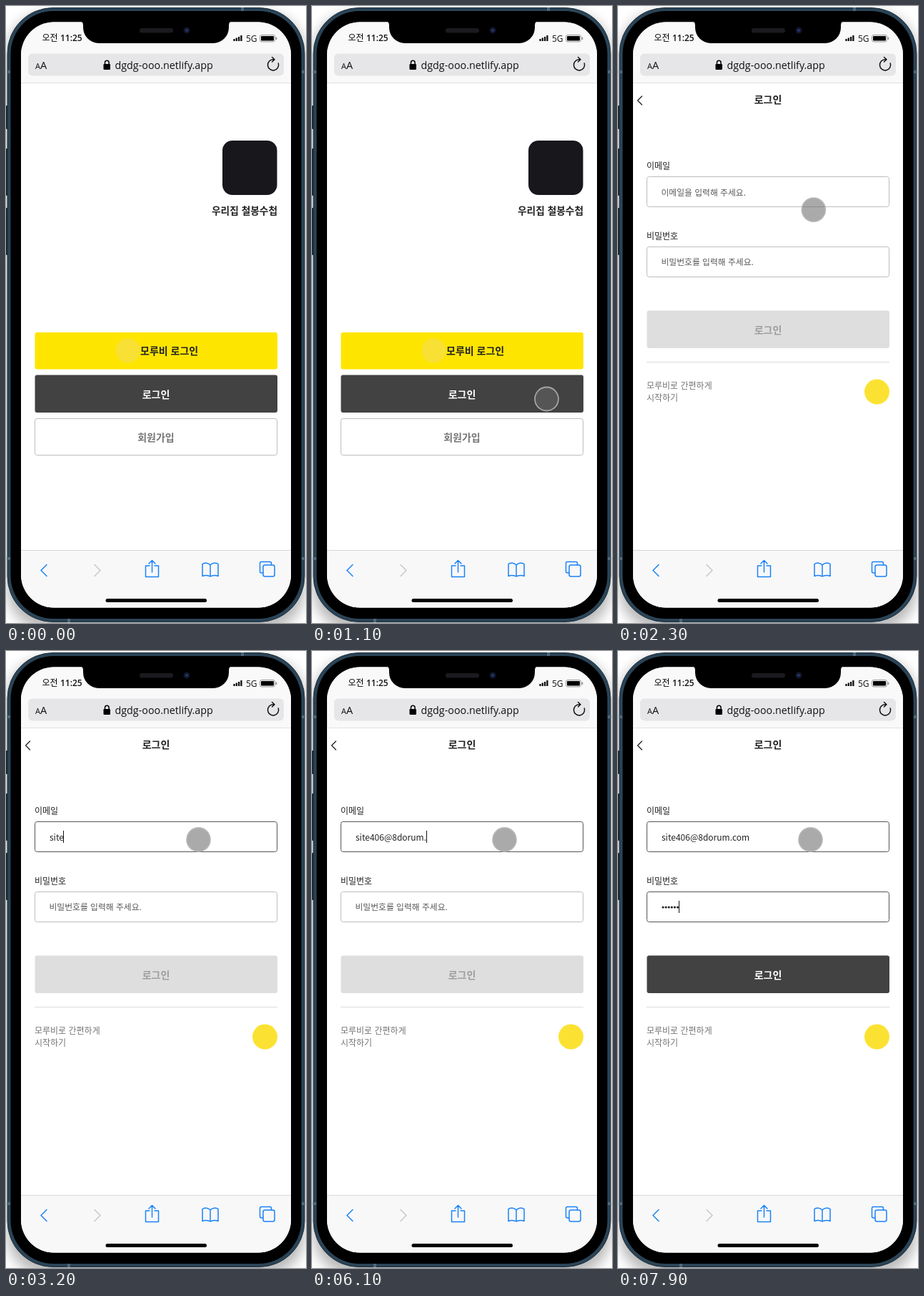
Recreate the animation shown at these times as an HTML page. Size 420 by 862 pixels, loop 8000 ms.

```html
<!DOCTYPE html>
<html lang="ko">
<head>
<meta charset="utf-8">
<title>로그인</title>
<style>
  html, body { margin: 0; width: 100%; height: 100%; overflow: hidden; background: #fff; }
  svg { display: block; width: 420px; height: 862px; }
  text { font: 12px "Noto Sans CJK KR", "Noto Sans CJK JP", "Noto Sans CJK", sans-serif; fill: #222; white-space: pre; }
  .bold { font-size: 14px; font-weight: 700; }
  .mid { text-anchor: middle; }
  .label { font-weight: 500; }
  .hint { font-size: 11.8px; fill: #585858; }
  .latin { font-family: "Open Sans", "Noto Sans", sans-serif; fill: #111; }
  .line { fill: none; stroke-linecap: round; stroke-linejoin: round; }
  .blue { stroke: #1a82f7; stroke-width: 1.5; }
  .box { fill: #fff; stroke: #bdbdbd; }
</style>
</head>
<body>
<svg viewBox="0 0 420 862">
  <!-- phone body -->
  <filter id="soft" x="-10%" y="-10%" width="120%" height="120%"><feGaussianBlur stdDeviation="9"/></filter>
  <rect x="2" y="10" width="416" height="862" rx="56" opacity=".28" filter="url(#soft)"/>
  <g fill="#1c2730">
    <rect y="139" width="4" height="33" rx="1"/>
    <rect y="199" width="4" height="66" rx="1"/>
    <rect y="282" width="4" height="66" rx="1"/>
  </g>
  <rect x="2" y="2.500" width="416" height="858" rx="64" fill="#2b4457" stroke="#1b2c39"/>
  <rect x="6.500" y="7" width="407" height="849" rx="60" fill="#000"/>
  <path d="M1 92h5M414 92h5M1 772h5M414 772h5M331 2v5M88 856v5" stroke="#50687a" stroke-width="4"/>

  <clipPath id="screen"><rect x="21" y="22.500" width="378" height="818" rx="46"/></clipPath>
  <g clip-path="url(#screen)">
    <rect x="21" y="22" width="378" height="819" fill="#fff"/>
    <rect x="21" y="22" width="378" height="85" fill="#f9f9fa"/>
    <path d="M21 107.500h378" stroke="#e2e2e4"/>

    <g id="welcome">
      <rect x="303" y="188" width="76.500" height="76" rx="14" fill="#17171c"/>
      <text class="bold" x="380" y="290.500" text-anchor="end" style="font-size:13.700px">우리집 철봉수첩</text>
      <rect id="quick" x="40.500" y="456" width="339.500" height="51.500" rx="3" fill="#fee500"/>
      <circle cx="170.500" cy="481.500" r="17" fill="#f9e035"/>
      <text class="bold" x="188" y="487">모루비 로그인</text>
      <rect x="40.500" y="515.500" width="339.500" height="52.500" rx="3" fill="#424242"/>
      <text class="bold mid" x="210" y="548" style="fill:#fff">로그인</text>
      <rect class="box" x="40.500" y="576.500" width="339" height="51" rx="3"/>
      <text class="bold mid" x="210" y="608" style="fill:#757575">회원가입</text>
    </g>

    <g id="login">
      <path class="line" d="M33.500 126l-6 6 6 6" stroke="#222" stroke-width="1.300"/>
      <text class="bold mid" x="210" y="136">로그인</text>
      <text class="label" x="40" y="227.500">이메일</text>
      <rect id="emailBox" class="box" x="40.500" y="238.500" width="339" height="42" rx="3"/>
      <text id="emailHint" class="hint" x="60.500" y="265">이메일을 입력해 주세요.</text>
      <text id="email" x="61" y="265"></text>
      <text class="label" x="40" y="325.500">비밀번호</text>
      <rect id="passBox" class="box" x="40.500" y="336.500" width="339" height="42" rx="3"/>
      <text id="passHint" class="hint" x="60.500" y="362">비밀번호를 입력해 주세요.</text>
      <g id="dots" fill="#222"></g>
      <path id="caret" d="M.5 0v17" stroke="#111"/>
      <rect x="40.500" y="425.500" width="339.500" height="52.500" rx="3" fill="#dedede"/>
      <text class="bold mid" x="210" y="458" style="fill:#9e9e9e">로그인</text>
      <g id="ready">
        <rect x="40.500" y="425.500" width="339.500" height="52.500" rx="3" fill="#424242"/>
        <text class="bold mid" x="210" y="458" style="fill:#fff">로그인</text>
      </g>
      <path d="M40 497.500h340" stroke="#dcdcdc"/>
      <text x="40" y="535" style="fill:#757575">모루비로 간편하게</text>
      <text x="40" y="552" style="fill:#757575">시작하기</text>
      <circle cx="362.500" cy="539" r="17.500" fill="#fbe232"/>
    </g>

    <!-- status bar -->
    <text class="label" x="50.500" y="49" style="fill:#000">오전 <tspan class="latin" font-weight="600">11:25</tspan></text>
    <path d="M319.500 49v-3M322.800 49v-4.500M326.100 49v-6M329.400 49v-8" stroke="#111" stroke-width="2.300"/>
    <text class="latin" x="336" y="49.500" font-weight="600">5G</text>
    <rect x="355.500" y="40.500" width="21" height="9.500" rx="2.500" fill="none" stroke="#999"/>
    <rect x="357" y="42" width="18" height="6.500" rx="1" fill="#000"/>
    <path d="M378.500 43.500v3.500" stroke="#888" stroke-width="1.500"/>

    <!-- address bar -->
    <rect x="31" y="66.500" width="358" height="31" rx="6" fill="#e6e6e8"/>
    <text class="latin" x="41" y="88" style="font-size:11px">A</text>
    <text class="latin" x="48" y="88" style="font-size:14.500px">A</text>
    <rect x="136.500" y="81" width="9.500" height="8" rx="1.200"/>
    <path class="line" d="M138.500 81v-2a2.800 2.800 0 0 1 5.600 0v2" stroke="#000" stroke-width="1.500"/>
    <text class="latin" x="152.500" y="88" style="font-size:14.300px">dgdg-ooo.netlify.app</text>
    <path class="line" d="M381.300 80a7.600 7.600 0 1 1-7.300-5.300h2M372.500 71.500l3.500 3.200-3.500 3.300" stroke="#111" stroke-width="1.500"/>

    <!-- toolbar -->
    <rect x="21" y="760" width="378" height="81" fill="#f8f8f9"/>
    <path d="M21 760.500h378" stroke="#d8d8da"/>
    <g class="line blue">
      <path d="M57 780.500l-8 8 8 8"/>
      <path d="M124 780.500l8 8-8 8" stroke="#c8c8cc"/>
      <path d="M201 782h-5.500v15.500h18v-15.500h-5.500M204.500 791v-16.500M200 779l4.500-4.500 4.500 4.500"/>
      <path d="M286 781c-3-3.500-8-3.500-11-1.500v17c3-1.500 8-1.500 11 .5c3-2 8-2 11-.5v-17c-3-2-8-2-11 1.500v16"/>
      <rect x="360" y="781" width="16" height="16" rx="2.500"/>
      <path d="M360 792h-2.500a2 2 0 0 1-2-2v-11.500a2 2 0 0 1 2-2h12a2 2 0 0 1 2 2v2.500"/>
    </g>
    <rect x="139.500" y="828" width="141.500" height="5" rx="2.500"/>
  </g>

  <!-- notch -->
  <path d="M104 21q4 1 4 6v3a22 22 0 0 0 22 22h160a22 22 0 0 0 22-22v-3q0-5 4-6z"/>
  <rect x="187" y="31" width="47" height="6.500" rx="3.200" fill="#1b1b1f"/>
  <circle cx="253" cy="34" r="4.500" fill="#11172b"/>
  <circle cx="253" cy="34" r="1.800" fill="#2c3c78"/>

  <circle id="pointer" r="16.500" fill="rgb(100,100,100)" fill-opacity=".55" stroke="#b4b4b4" stroke-opacity=".85" stroke-width="1.800"/>
</svg>
<script>
const LOOP = 8000, STEP = 100;
const $ = id => document.getElementById(id);
const show = (id, on) => $(id).style.display = on ? "" : "none";
const countUntil = (times, t) => times.filter(at => at <= t).length;
const clamp = v => Math.max(0, Math.min(1, v));

const PAGE_AT = 1800, EMAIL_AT = 2500, PASS_AT = 6600;
const address = "site406@8dorum.com";
const emailKeys = [2900, 3000, 3100, 3200, 3500, 3600, 3800, 4000, 4200,
                   4900, 5100, 5200, 5400, 5800, 6100, 6200, 6300, 6400];
const passKeys = [6900, 7100, 7300, 7500, 7800, 7900];
const DOT_GAP = 4.1;

// time, x, y
const path = [[600, 397, 843], [700, 361, 612], [800, 330, 389], [900, 328.5, 505.5],
              [1000, 328.5, 541], [1100, 328.5, 549], [1800, 328.5, 549], [2400, 269.5, 263.5]];

function pointerAt(t) {
  const next = path.findIndex(p => p[0] > t);
  if (next < 0) return path.at(-1).slice(1);
  const [t0, x0, y0] = path[next - 1], [t1, x1, y1] = path[next];
  const u = (t - t0) / (t1 - t0), k = u * u * (3 - 2 * u);
  return [x0 + (x1 - x0) * k, y0 + (y1 - y0) * k];
}

function drawPointer(t) {
  const visible = t >= path[0][0];
  show("pointer", visible);
  const [x, y] = visible ? pointerAt(t) : [0, 0];
  $("pointer").setAttribute("transform", `translate(${x} ${y})`);
  $("quick").setAttribute("stroke", y > 456 && y < 508 ? "#222" : "none");
}

function drawForm(t) {
  const typed = countUntil(emailKeys, t), hidden = countUntil(passKeys, t);
  const inPass = t >= PASS_AT;
  $("email").textContent = address.slice(0, typed);
  show("emailHint", !typed);
  show("passHint", !hidden);
  $("emailBox").style.stroke = t >= EMAIL_AT ? "#555" : "";
  $("passBox").style.stroke = inPass ? "#555" : "";
  $("dots").innerHTML = Array.from({ length: hidden }, (_, i) =>
    `<circle cx="${63 + i * DOT_GAP}" cy="358" r="1.6"/>`).join("");

  const width = inPass ? hidden * DOT_GAP : typed && $("email").getComputedTextLength();
  show("caret", t >= EMAIL_AT);
  $("caret").setAttribute("transform", `translate(${Math.floor(61 + width)} ${inPass ? 349 : 251})`);
  $("ready").style.opacity = clamp((t - passKeys[0] + STEP) / 300);
}

function render() {
  const t = Math.floor(performance.now() % LOOP / STEP) * STEP;
  show("welcome", t < PAGE_AT);
  show("login", t >= PAGE_AT);
  drawPointer(t);
  drawForm(t);
  requestAnimationFrame(render);
}
render();
</script>
</body>
</html>
```
